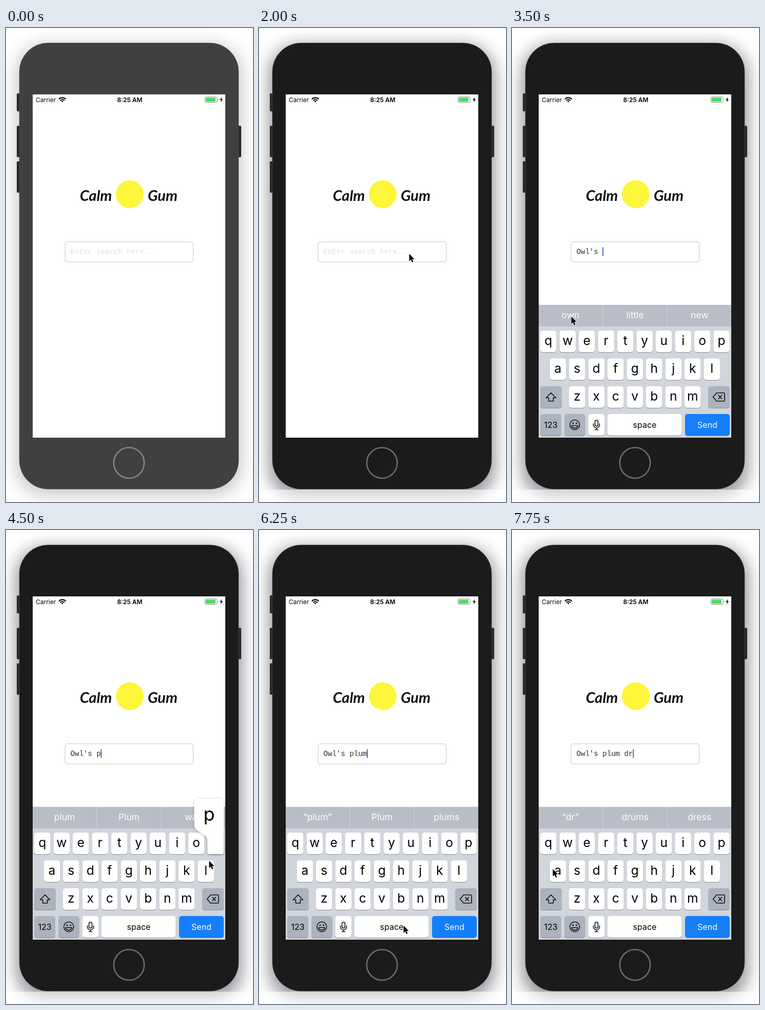
Write an HTML page that moves like this. It is 481 by 921 pixels and loops after 8 s.

```html
<!DOCTYPE html>
<html lang="en">
<head>
<meta charset="utf-8">
<title>Phone search</title>
<style>
  html, body { margin: 0; width: 100%; height: 100%; overflow: hidden; background: #fff; }
  svg { display: block; width: 100vw; height: 100vh; }
  text { font-family: Inter, Roboto, sans-serif; }
  .mid { text-anchor: middle; }
  .brand { font: italic 700 29px Lato, sans-serif; text-anchor: middle; fill: #111; }
  .field { font: 14.1px "Liberation Mono", "Courier New", monospace; white-space: pre; }
  .line { fill: none; stroke: #111; stroke-width: 1.6; stroke-linecap: round; stroke-linejoin: round; }
</style>
</head>
<body>
<svg viewBox="0 0 481 921">
  <defs>
    <filter id="blur" x="-25%" y="-20%" width="150%" height="140%"><feGaussianBlur stdDeviation="17"/></filter>
    <filter id="lift" x="-30%" y="-30%" width="160%" height="160%">
      <feDropShadow dx="0" dy="1" stdDeviation="2.5" flood-color="#000" flood-opacity=".3"/>
    </filter>
    <clipPath id="upper"><rect width="481" height="897"/></clipPath>
  </defs>
  <rect width="481" height="921" fill="#fff"/>
  <rect x="20" y="32" width="439" height="876" rx="58" fill="#4a4858" opacity=".3" filter="url(#blur)"/>
  <g clip-path="url(#upper)">
    <rect id="shade" x="24" y="40" width="431" height="872" rx="50" filter="url(#blur)"/>
  </g>
  <g id="buttons">
    <rect x="21" y="127" width="8" height="35" rx="2"/>
    <rect x="21" y="190" width="8" height="61" rx="2"/>
    <rect x="21" y="259" width="8" height="61" rx="2"/>
    <rect x="450" y="190" width="8" height="61" rx="2"/>
  </g>
  <rect id="body" x="26" y="29" width="427" height="867" rx="56" stroke="#555" stroke-opacity=".5"/>
  <circle id="home" cx="239.5" cy="845" r="29.7" fill="none" stroke-width="2.6"/>
  <rect x="52" y="129" width="375" height="667" fill="#fff"/>

  <text x="58" y="143.5" font-size="12">Carrier</text>
  <g fill="none" stroke="#000" stroke-width="2.1">
    <path d="M103 138.2a9.4 9.4 0 0 1 13.4 0M105.6 141a5.8 5.8 0 0 1 8.2 0"/>
    <path d="M109.7 144.6l-2-2a2.8 2.8 0 0 1 4 0z" fill="#000" stroke="none"/>
  </g>
  <text class="mid" x="241" y="143.5" font-size="12" font-weight="600">8:25 AM</text>
  <rect x="387.5" y="134" width="23.5" height="10.6" rx="2.4" fill="#fff" stroke="#888"/>
  <rect x="389" y="135.5" width="19" height="7.6" rx="1" fill="#4cd964"/>
  <path d="M412.3 137.5q1.6 1.8 0 3.6z" fill="#888"/>
  <path d="M420.5 134l-4.3 6h2.7l-1.2 4.6 4.5-6.2h-2.8z"/>

  <text class="brand" x="175" y="336">Calm</text>
  <circle cx="241" cy="323" r="27" fill="#fdf63a"/>
  <text class="brand" x="305" y="336">Gum</text>

  <rect x="115" y="415.5" width="249.5" height="39" rx="3.5" fill="#fff" stroke="#c6c6c6"/>
  <g id="live"></g>
  <path id="mouse" d="M.5 .8v14.2l3.3-3 2.3 5.3 2.4-1-2.3-5.2h4.4z" fill="#000" stroke="#fff" stroke-width="1.6" paint-order="stroke"/>
</svg>
<script>
const $ = id => document.getElementById(id);
const LOOP = 8000, STEP = 250;
const ROWS = [["qwertyuiop", 55, 588], ["asdfghjkl", 73.6, 642], ["zxcvbnm", 111, 696]];
const KEY_W = 31.5, PITCH = 37.48;

// time, typed text, suggestions, pressed key
const STATES = [
  [0, ""],
  [2250, "", "Owl's Saltmarsh Fern"],
  [3500, "Owl's ", "own little new"],
  [4500, "Owl's p", "plum Plum way", "p"],
  [4750, "Owl's p", "plum Plum way"],
  [5000, "Owl's pl", "“pl” plum please", "l"],
  [5250, "Owl's pl", "“pl” plum please"],
  [5500, "Owl's plu", "“plu” plum plus", "u"],
  [5750, "Owl's plum", "“plum” Plum plums", "m"],
  [6000, "Owl's plum", "“plum” Plum plums"],
  [6500, "Owl's plum ", "tree and pie", " "],
  [6750, "Owl's plum ", "tree and pie"],
  [7000, "Owl's plum d", "“d” do day", "d"],
  [7250, "Owl's plum d", "“d” do day"],
  [7500, "Owl's plum dr", "“dr” drums dress", "r"],
  [7750, "Owl's plum dr", "“dr” drums dress"]
];

// pointer stops: time, x, y
const PATH = [
  [1000, 405, 760], [1500, 306, 498], [1750, 293, 447], [2000, 292, 438], [2500, 271, 691],
  [3250, 116, 562], [3500, 115, 560], [4250, 405, 612], [4500, 395, 642], [5000, 388, 664],
  [5500, 294, 612], [5750, 350, 716], [6250, 281, 768], [6500, 278, 770], [7000, 163, 664],
  [7500, 182, 614], [7750, 79, 658]
];

const label = (s, x, y, size, fill = "#000") =>
  `<text class="mid" x="${x}" y="${y}" font-size="${size}" fill="${fill}">${s}</text>`;

const key = (x, y, w, fill = "#fff") =>
  `<rect x="${x}" y="${y + 1}" width="${w}" height="42" rx="5" fill="#898b90"/>` +
  `<rect x="${x}" y="${y}" width="${w}" height="42" rx="5" fill="${fill}"/>`;

function bubble(ch, x, y) {
  const left = Math.max(55, Math.min(366.7, x - 13.2)), right = left + 57.5;
  const top = y - 66, end = x + KEY_W;
  return `<path filter="url(#lift)" fill="#fff" d="M${left + 9} ${top}H${right - 9}q9 0 9 9V${y - 14}
    C${right} ${y} ${end} ${y} ${end} ${y + 16}V${y + 37}q0 5-5 5H${x + 5}q-5 0-5-5V${y + 16}
    C${x} ${y} ${left} ${y} ${left} ${y - 14}V${top + 9}q0-9 9-9z"/>` +
    label(ch, (left + right) / 2, y - 23, 36);
}

function keyboard(hints, pressed, upper) {
  const grey = "#adb3be";
  let out = `<rect x="52" y="538" width="375" height="258" fill="#d1d5dc"/>
    <rect x="52" y="538" width="375" height="42" fill="#b8bdc7"/>
    <path d="M176.5 538v42M302.5 538v42" stroke="#d1d5dc"/>`;
  hints.split(" ").forEach((s, i) => out += label(s, 114 + i * 125.6, 564, 17.5, "#fff"));

  let pop = "";
  for (const [chars, x0, y] of ROWS) {
    [...chars].forEach((c, i) => {
      const x = x0 + i * PITCH, mid = x + KEY_W / 2;
      out += key(x, y, KEY_W);
      if (c === pressed) pop = bubble(c, x, y);
      else out += upper ? label(c.toUpperCase(), mid, y + 29.5, 22.5) : label(c, mid, y + 28, 24.5);
    });
  }

  out += key(55, 696, 42, upper ? "#fff" : grey) +
    `<path class="line" style="fill:${upper ? "#000" : "none"}" d="M76 709l9.5 9.5h-5v6.5h-9v-6.5h-5z"/>` +
    key(382, 696, 42, grey) +
    `<path class="line" d="M391.5 717l7-8h13.5q2 0 2 2v12q0 2-2 2h-13.5zM402 713.5l6.5 7m0-7l-6.5 7"/>` +
    key(55, 750, 41, grey) + label("123", 75.5, 777, 16) +
    key(102, 750, 40.5, grey) +
    `<circle class="line" cx="122.2" cy="771" r="9.5"/><path class="line" d="M116.2 772.5h12q-1 5-6 5t-6-5z"/>
     <circle cx="119" cy="768" r="1.4"/><circle cx="125.5" cy="768" r="1.4"/>` +
    key(148.5, 750, KEY_W) +
    `<rect class="line" x="161.5" y="762" width="6" height="11.5" rx="3"/>
     <path class="line" d="M158.5 769v2a6 6 0 0 0 12 0v-2M164.5 777v3.5m-3 0h6"/>` +
    key(186, 750, 144.5, pressed === " " ? grey : "#fff") + label("space", 258.5, 776.5, 16) +
    key(337, 750, 87, "#157efb") + label("Send", 380.5, 776.5, 16, "#fff");
  return out + pop;
}

function field(typed, active) {
  const caret = 126 + typed.length * 8.46;
  return `<text class="field" xml:space="preserve" x="125.5" y="439" fill="${typed ? "#2b2b2b" : "#e2dde1"}">${typed || "Enter search here..."}</text>` +
    (active ? `<rect x="${caret - .7}" y="426" width="2" height="17" fill="#4a6be0"/>` : "");
}

function pointer(t) {
  const i = Math.max(1, PATH.findIndex(p => p[0] >= t));
  const [t0, x0, y0] = PATH[i - 1], [t1, x1, y1] = PATH[i];
  const k = (t - t0) / (t1 - t0);
  return [x0 + (x1 - x0) * k, y0 + (y1 - y0) * k];
}

function draw(t) {
  const dark = t >= 2000;
  $("body").setAttribute("fill", dark ? "#1b1b1b" : "#404040");
  $("buttons").setAttribute("fill", dark ? "#2a2a2a" : "#272727");
  $("home").setAttribute("stroke", dark ? "#6c6c6c" : "#858585");
  $("shade").setAttribute("fill", t >= 7250 ? "#222" : "#2c2c38");
  $("shade").setAttribute("opacity", dark ? .36 : 0);

  const [, typed, hints, pressed] = STATES.filter(s => s[0] <= t).pop();
  $("live").innerHTML = field(typed, hints) + (hints ? keyboard(hints, pressed, !typed) : "");

  const shown = t >= PATH[0][0];
  $("mouse").setAttribute("visibility", shown ? "visible" : "hidden");
  if (shown) $("mouse").setAttribute("transform", `translate(${pointer(t)})`);
}

const start = performance.now();
let last = -1;
function tick() {
  const t = Math.floor((performance.now() - start) % LOOP / STEP) * STEP;
  if (t !== last) draw(last = t);
  requestAnimationFrame(tick);
}
tick();
</script>
</body>
</html>
```
